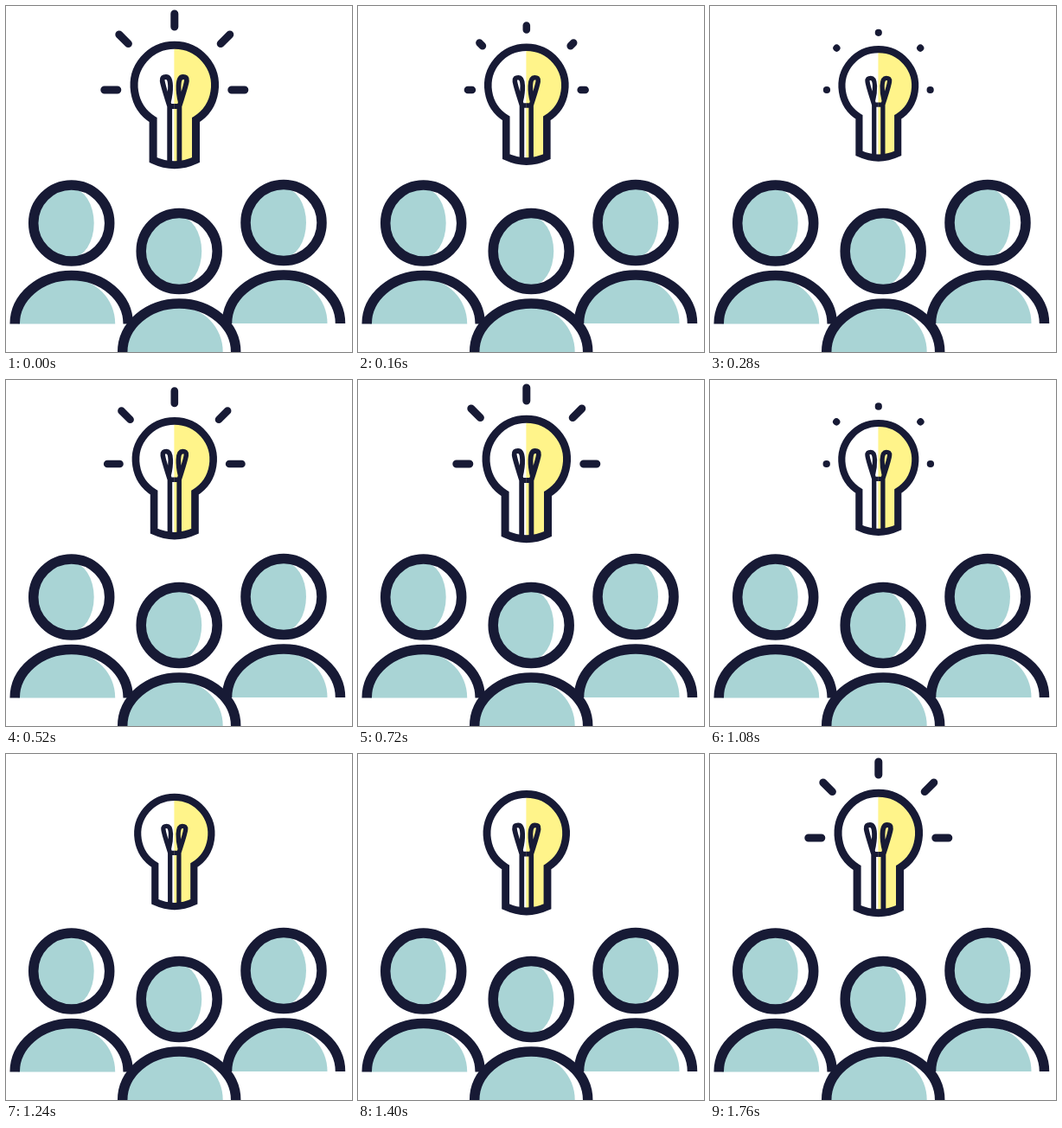
An HTML page that plays this animation: 400 by 400 pixels, repeating every 2.28 s.

```html
<!DOCTYPE html>
<html lang="en">
<head>
<meta charset="utf-8">
<title>Shared idea</title>
<style>
  html, body { margin: 0; width: 100%; height: 100%; overflow: hidden; background: #fff; }
  svg { display: block; width: 100vw; height: 100vh; }
  .line { fill: none; stroke: #171a35; }
  .white { fill: #fff; }
  .teal { fill: #a9d4d5; }
</style>
</head>
<body>
<svg viewBox="0 0 400 400">
  <defs>
    <!-- Origin is the centre of the head -->
    <g id="person" stroke-width="11.5">
      <circle class="white" r="44"/>
      <path class="teal" d="M0-40A40 40 0 0 0 0 40A26 40 0 0 0 0-40"/>
      <circle class="line" r="44"/>
      <path class="white" d="M-65.500 116.500A65.500 56 0 0 1 65.500 116.500"/>
      <path class="teal" d="M-62 116.500A62 52 0 0 1 0 64.500A50.500 52 0 0 1 50.500 116.500"/>
      <path class="line" d="M-65.500 116.500A65.500 56 0 0 1 65.500 116.500"/>
    </g>
    <path id="filament" d="M-5.600 84V19H0M-5.600 19C-15-11-17-15-9.800-15C-3-15-4 2-7 14"/>
  </defs>

  <use href="#person" x="75.700" y="251"/>
  <use href="#person" x="321" y="250.500"/>
  <use href="#person" x="200.200" y="283.500"/>

  <!-- Origin is the point the bulb grows from -->
  <g id="bulb">
    <path fill="#fff48a" d="M-.4-51.700A46.700 46.700 0 0 1 24.700 34.600V81Q12 87-.4 87Z"/>
    <g class="line" stroke-width="5.800" stroke-linejoin="round">
      <use href="#filament"/>
      <use href="#filament" transform="scale(-1 1)"/>
    </g>
    <path class="line" stroke-width="9" d="M-24.700 81V34.600A46.700 46.700 0 1 1 24.700 34.600V81Q0 92.500-24.700 81Z"/>
    <path id="rays" class="line" stroke-width="9" stroke-linecap="round"/>
  </g>
</svg>
<script>
const LOOP = 2280, STEP = 40, RAY = 15;
const bulb = document.getElementById('bulb');
const rays = document.getElementById('rays');

// Eased rise from 0 to 1 between two times
function ramp(t, from, to) {
  const x = Math.min(1, Math.max(0, (t - from) / (to - from)));
  return (1 - Math.cos(Math.PI * x)) / 2;
}

// A ray and its mirror image, growing outwards from the given radius
function rayPair(degrees, radius, length) {
  const angle = degrees * Math.PI / 180;
  const x = Math.cos(angle), y = -Math.sin(angle), end = radius + length;
  return [-1, 1].map(side =>
    `M${side * x * radius} ${y * radius}L${side * x * end} ${y * end}`).join('');
}

function draw(now) {
  const t = Math.floor(now % LOOP / STEP) * STEP;
  const shrink = ramp(t, 0, 333) - ramp(t, 333, 667) + ramp(t, 720, 1167) - ramp(t, 1167, 1500);
  const shown = 1 - ramp(t, 0, 267) + ramp(t, 267, 533) - ramp(t, 833, 1100) + ramp(t, 1500, 1760);
  const length = RAY * shown;

  bulb.setAttribute('transform', `translate(194.8 97) scale(${1 - .1 * shrink})`);
  rays.setAttribute('d', shown > .001
    ? rayPair(0, 66, length) + rayPair(45, 75.5, length) + rayPair(90, 73, length)
    : '');
}

let start;
function tick(now) {
  start ??= now;
  draw(now - start);
  requestAnimationFrame(tick);
}
draw(0);
requestAnimationFrame(tick);
</script>
</body>
</html>
```
